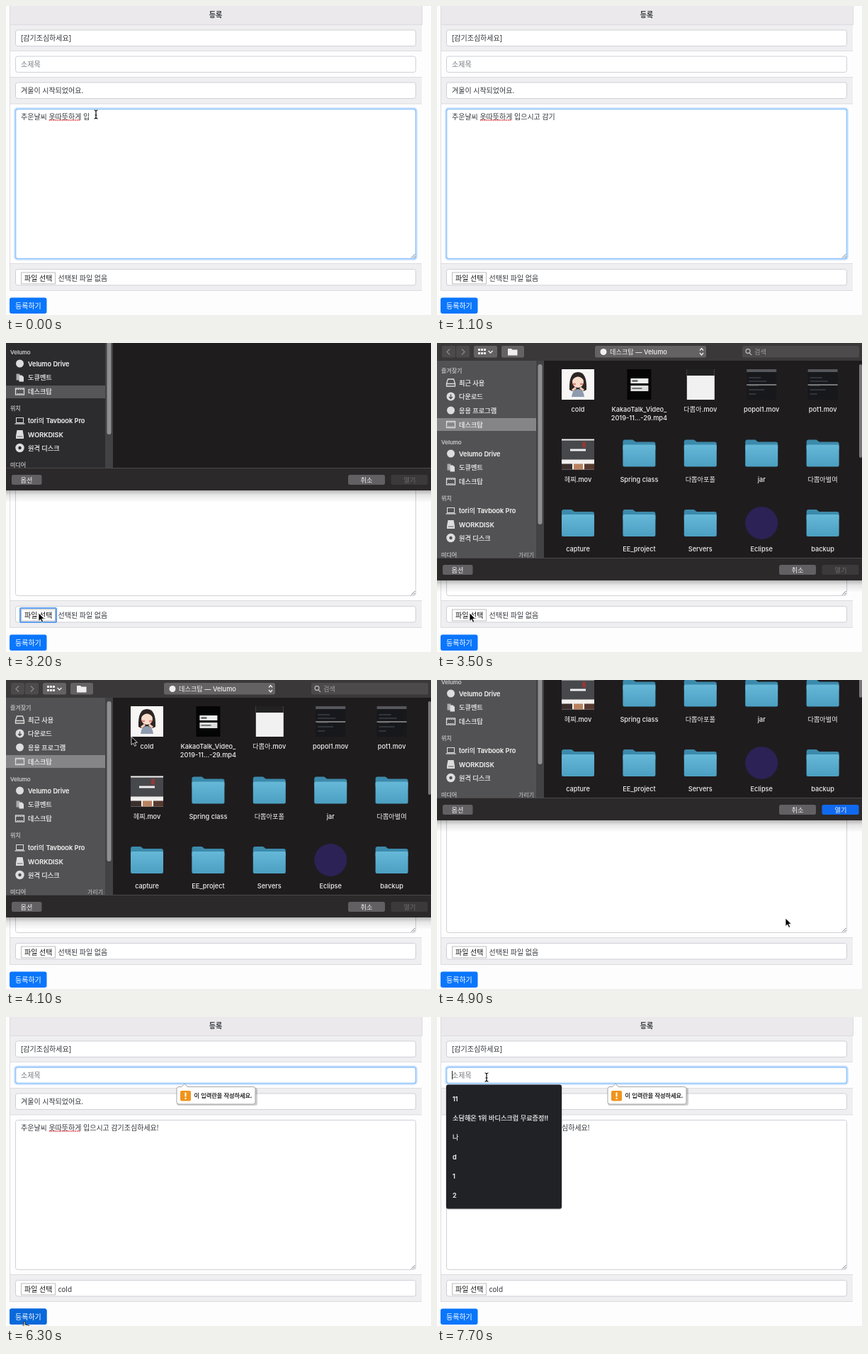
An HTML page that plays this animation: 600 by 436 pixels, repeating every 8000 ms.

```html
<!DOCTYPE html>
<html lang="ko">
<head>
<meta charset="utf-8">
<title>등록</title>
<style>
html, body { margin: 0; width: 100%; height: 100%; overflow: hidden; background: #fefdfe; }
svg { display: block; width: 600px; height: 436px; }
text { font: 10px "Noto Sans", "Noto Sans CJK KR", sans-serif; fill: #33363b; white-space: pre; }
.ui text { font: 500 9.2px Inter, "Noto Sans CJK KR", sans-serif; fill: #f0f0f0; }
.ui .head { font-size: 8px; fill: #c2c2c4; }
#side text, #menu text { stroke: #f0f0f0; stroke-width: .22px; }
#side .head { stroke: #c2c2c4; }
#bubble text { font-size: 8.2px; font-weight: 500; fill: #111; stroke: #111; stroke-width: .22px; }
.mid { text-anchor: middle; }
.field { fill: #fff; stroke: #ced1d6; }
.focus rect { fill: none; stroke: #8fc4fb; stroke-width: 1.6; }
.focus rect + rect { stroke: #bfdcff; stroke-width: 1.4; }

/* 8 s loop: 1% is 80 ms */
.on { opacity: 0; animation: 8s step-end infinite; }
#areaFocus { animation-name: areaFocus; }
#subFocus { animation-name: subFocus; }
#pickFocus { animation-name: pickFocus; }
#noFile { animation-name: noFile; }
#gotFile { animation-name: gotFile; }
#hover { animation-name: hover; }
#press { animation-name: press; }
#caret { animation-name: caret; }
#menu { animation-name: menu; }
.dim { animation-name: dim; }
.lit { animation-name: lit; }
#picked, #openOn { animation-name: picked; }
#beam { animation-name: beam; }
#arrow { animation-name: arrow; }
#hand { animation-name: hand; }
@keyframes areaFocus { 0% { opacity: 1 } 35.6%, 100% { opacity: 0 } }
@keyframes subFocus { 0% { opacity: 0 } 68.75%, 100% { opacity: 1 } }
@keyframes pickFocus { 0%, 42.5% { opacity: 0 } 35.6%, 62.5% { opacity: 1 } 68.75%, 100% { opacity: 0 } }
@keyframes noFile { 0% { opacity: 1 } 62.5%, 100% { opacity: 0 } }
@keyframes gotFile { 0% { opacity: 0 } 62.5%, 100% { opacity: 1 } }
@keyframes hover { 0% { opacity: 0 } 64.5% { opacity: 1 } 86%, 100% { opacity: 0 } }
@keyframes press { 0% { opacity: 0 } 65% { opacity: 1 } 68.75%, 100% { opacity: 0 } }
@keyframes caret {
  0%, 75%, 87.5% { opacity: 0 }
  68.75%, 81.25%, 92.5%, 100% { opacity: 1 }
}
@keyframes menu { 0% { opacity: 0 } 93.75%, 100% { opacity: 1 } }
@keyframes dim { 0% { opacity: 1 } 42.5%, 100% { opacity: 0 } }
@keyframes lit { 0% { opacity: 0 } 42.5%, 100% { opacity: 1 } }
@keyframes picked { 0% { opacity: 0 } 53.75%, 100% { opacity: 1 } }
@keyframes beam { 0%, 30%, 89%, 100% { opacity: 1 } 1.25%, 33.75% { opacity: 0 } }
@keyframes arrow { 0%, 64.5%, 89%, 100% { opacity: 0 } 33.75%, 86% { opacity: 1 } }
@keyframes hand { 0% { opacity: 0 } 64.5% { opacity: 1 } 86%, 100% { opacity: 0 } }

#bubble { animation: bubble 8s linear infinite; }
@keyframes bubble { 0%, 71.25% { opacity: 0 } 75%, 100% { opacity: 1 } }

#sheet { animation: sheet 8s step-end infinite; }
@keyframes sheet {
  0%, 62.5%, 100% { transform: translateY(-370px) }
  40% { transform: translateY(-127px) }
  41.25% { transform: translateY(-32px) }
  42.5% { transform: none }
  60% { transform: translateY(-32px) }
  61.25% { transform: translateY(-137px) }
}

#pointer { animation: pointer 8s ease-in-out infinite; }
@keyframes pointer {
  0%, 30% { transform: translate(127px, 153px) }
  35%, 43.75% { transform: translate(46px, 381px) }
  50%, 51.25% { transform: translate(177px, 80px) }
  53.1%, 53.75% { transform: translate(198px, 62px) }
  56.9%, 58.75% { transform: translate(568px, 319px) }
  61.25% { transform: translate(492px, 336px) }
  65%, 85% { transform: translate(26px, 430px) }
  90%, 100% { transform: translate(70px, 85px) }
}

.ring { fill: none; stroke: #111; stroke-width: 1.5; opacity: 0; animation: ring 8s linear infinite; }
@keyframes ring {
  0% { r: 8px; opacity: 1 }
  1.25% { r: 23.5px; opacity: 1 }
  3.75%, 100% { r: 42px; opacity: 0 }
}
</style>
</head>
<body>
<svg viewBox="0 0 600 436">
  <defs>
    <linearGradient id="shade" x2="0" y2="1">
      <stop stop-color="#000" stop-opacity=".28"/>
      <stop offset=".4" stop-color="#000" stop-opacity=".09"/>
      <stop offset="1" stop-color="#000" stop-opacity="0"/>
    </linearGradient>
    <linearGradient id="blue" x2="0" y2="1">
      <stop stop-color="#66b8d8"/><stop offset="1" stop-color="#4b9fc1"/>
    </linearGradient>
    <g id="folder">
      <path d="M-23 -17q0-3 3-3h11l4 3h25q3 0 3 3v8h-46z" fill="#3c8aab"/>
      <rect x="-23" y="-13" width="46" height="31" rx="2" fill="url(#blue)"/>
    </g>
  </defs>

  <g id="page">
    <rect width="600" height="436" fill="#fefdfe"/>
    <g fill="#efeef0">
      <rect x="5" width="582" height="27" fill="#ebe9ec"/>
      <rect x="5" y="27" width="582" height="37"/>
      <rect x="5" y="101" width="582" height="37"/>
      <rect x="5" y="364" width="582" height="37"/>
    </g>
    <path d="M5.5 0V401.5H587M5 26.5H587.5V0M5 63.5H587M5 100.5H587M5 138H587M5 363.5H587" fill="none" stroke="#dcdbdf"/>
    <g class="field">
      <rect x="13.5" y="34" width="565" height="22.5" rx="3"/>
      <rect x="13.5" y="71" width="565" height="22.5" rx="3"/>
      <rect x="13.5" y="108" width="565" height="22.5" rx="3"/>
      <rect x="13.5" y="145.5" width="565" height="211" rx="3"/>
      <rect x="13.5" y="371.5" width="565" height="22.5" rx="3"/>
    </g>
    <path d="M572 355.5l5.5-5.5M575 355.5l2.5-2.5" stroke="#666" stroke-width=".9"/>
    <g id="areaFocus" class="on focus">
      <rect x="13.5" y="145.5" width="565" height="211" rx="3"/>
      <rect x="12" y="144" width="568" height="214" rx="4"/>
    </g>
    <g id="subFocus" class="on focus">
      <rect x="13.5" y="71" width="565" height="22.5" rx="3"/>
      <rect x="12" y="69.5" width="568" height="25.5" rx="4"/>
    </g>
    <text class="mid" x="296" y="16" style="font-weight:700">등록</text>
    <text x="21" y="48.5">[감기조심하세요]</text>
    <text x="21" y="85.5" style="fill:#74797f">소제목</text>
    <text x="21" y="122.5">겨울이 시작되었어요.</text>
    <text id="typed" x="21" y="159.5">추운날씨 옷따뜻하게 입</text>
    <path d="M61 161H105" stroke="#e0343c" stroke-width="1.5" stroke-dasharray="1.6 1"/>
    <path id="caret" class="on" d="M21.5 76V88" stroke="#222"/>

    <rect x="21.5" y="376" width="48" height="16" fill="#fff" stroke="#bdbdbd"/>
    <rect id="pickFocus" class="on" x="20" y="374" width="51" height="20" rx="1.5" fill="none" stroke="#5f9ff0" stroke-width="2.2"/>
    <text x="26" y="387.5" style="fill:#111">파일 선택</text>
    <text id="noFile" class="on" x="73.5" y="387.5">선택된 파일 없음</text>
    <text id="gotFile" class="on" x="73.5" y="387.5">cold</text>

    <g fill="#0a76fc">
      <rect x="5" y="411.5" width="52.5" height="22.5" rx="3"/>
      <rect id="hover" class="on" x="5" y="411.5" width="52.5" height="22.5" rx="3" fill="#0869da"/>
      <rect id="press" class="on" x="5" y="411.5" width="52.5" height="22.5" rx="3" fill="#0a5dc6"/>
    </g>
    <text x="13" y="426.5" style="fill:#fff">등록하기</text>
  </g>

  <g id="bubble">
    <path d="M244 100h7l3-5 3 5h95q3 0 3 3v19q0 3-3 3h-108q-3 0-3-3v-19q0-3 3-3z" fill="#000" opacity=".18"/>
    <path d="M244 98.5h4l4-4.5 4 4.5h93q3 0 3 3v18.5q0 3-3 3h-105q-3 0-3-3v-18.5q0-3 3-3z" fill="#fff" stroke="#a5a5a5"/>
    <rect x="246" y="104" width="15" height="14.5" rx="2" fill="#f0941d"/>
    <path d="M253.5 106.5v6M253.5 114v2" stroke="#fff" stroke-width="2"/>
    <text x="265.5" y="114">이 입력란을 작성하세요.</text>
  </g>
  <g id="menu" class="on ui">
    <rect x="12.5" y="95.5" width="164" height="176" rx="3.5" fill="#000" opacity=".25"/>
    <rect x="13" y="95.5" width="163" height="175" rx="3" fill="#212226"/>
  </g>

  <g id="sheet" class="ui">
    <rect y="335" width="600" height="17" fill="url(#shade)"/>
    <rect width="600" height="335" fill="#2b292a"/>
    <rect width="600" height="25" fill="#3a3839"/>
    <g fill="#4d4a4c">
      <rect x="7" y="4" width="19" height="16.5" rx="2.5"/>
      <rect x="27" y="4" width="19" height="16.5" rx="2.5"/>
      <rect x="431" y="4" width="165" height="16.5" rx="2.5"/>
      <g fill="#656264">
        <rect x="52" y="4" width="33" height="16.5" rx="2.5"/>
        <rect x="91" y="4" width="32" height="16.5" rx="2.5"/>
        <rect x="223" y="4" width="157" height="16.5" rx="2.5"/>
      </g>
    </g>
    <g fill="none" stroke="#8a8789" stroke-width="1.3">
      <path d="M18 8.5l-4 4 4 4M35 8.5l4 4-4 4"/>
      <g stroke="#b5b2b4"><circle cx="439" cy="11.5" r="3"/><path d="M441 14l3 3"/></g>
      <path d="M72.5 11l3 3 3-3M371 10.500l2.500-3 2.500 3M371 14l2.500 3 2.500-3" stroke="#eee"/>
    </g>
    <path d="M58 9.5h11M58 14.5h11" stroke="#eee" stroke-width="3" stroke-dasharray="3 1"/>
    <path d="M100 8h5l1.5 1.5h7v8h-13.5z" fill="#eee"/>
    <circle cx="235" cy="12.5" r="4.5" fill="#f0f0f0"/>
    <text x="244" y="16">데스크탑 — Velumo</text>
    <text x="448" y="16" style="fill:#a09d9f">검색</text>

    <rect y="25" width="140" height="279" fill="#525254"/>
    <g class="on dim">
      <rect y="25" width="140" height="279" fill="#2c2b2d"/>
      <rect y="187" width="140" height="18" fill="#565658"/>
    </g>
    <g class="on lit">
      <rect y="106" width="140" height="18" fill="#858587"/>
      <text class="head" x="115" y="302">가리기</text>
    </g>
    <rect x="140" y="25" width="11" height="279" fill="#424144"/>
    <rect x="142.5" y="30" width="6" height="226" rx="3" fill="#8f8e91"/>
    <g id="side"></g>

    <rect x="151" y="25" width="449" height="278" fill="#1f1c1e"/>
    <g class="on lit">
      <g id="picked" class="on">
        <rect x="173" y="34" width="52" height="49" rx="3" fill="#434144"/>
        <rect x="185" y="87" width="28" height="13" rx="2.5" fill="#1260d8"/>
      </g>
      <g id="files"></g>
      <rect x="596" y="30" width="4" height="132" rx="2" fill="#777578"/>
    </g>

    <path d="M0 303.5H600" stroke="#4a484a"/>
    <rect y="304" width="600" height="31" fill="#2b292a"/>
    <g fill="#626062">
      <rect x="8" y="313" width="42.5" height="14" rx="2.5"/>
      <rect x="483" y="313" width="52" height="14" rx="2.5"/>
      <rect x="543.5" y="313" width="52" height="14" rx="2.5" fill="#3b393a"/>
    </g>
    <text class="mid" x="29" y="323.5">옵션</text>
    <text class="mid" x="509" y="323.5">취소</text>
    <text class="mid" x="570" y="323.5" style="fill:#6f6d6e">열기</text>
    <g id="openOn" class="on">
      <rect x="543.5" y="313" width="52" height="14" rx="2.5" fill="#1069ee"/>
      <text class="mid" x="570" y="323.5">열기</text>
    </g>
  </g>

  <g id="rings"></g>
  <g id="pointer">
    <path id="beam" class="on" d="M-2.5 -6q2.5 0 2.5 2v8q0 2-2.5 2M2.5 -6q-2.5 0-2.5 2v8q0 2 2.5 2M-1.5 1h3" fill="none" stroke="#111" stroke-width="1.2"/>
    <path id="arrow" class="on" d="M0 0v11.5l2.7-2.5 2 4.3 2-.9-2-4.2h3.7z" fill="#000" stroke="#fff" stroke-width=".8"/>
    <path id="hand" class="on" d="M-1 0q1-1.5 2 0v4l5 1q1.5 .5 1 3l-1 5h-6l-4-6q0-1.5 1.5-1l1.5 1z" fill="#fff" stroke="#111" stroke-width=".9"/>
  </g>
</svg>
<script>
const $ = id => document.getElementById(id);
const label = (x, y, s, cls = "") => `<text class="${cls}" x="${x}" y="${y}">${s}</text>`;
const box = (x, y, w, h, fill) => `<rect x="${x}" y="${y}" width="${w}" height="${h}" fill="${fill}"/>`;

// Sidebar
const icons = {
  drawer: '<path d="M-4 -5h8l2 6v4h-12v-4zM-5.5 1.5h11" fill="none" stroke="#ddd" stroke-width="1.3"/>',
  down: '<circle r="6" fill="#ddd"/><path d="M0 -3v6M-2.5 .5l2.5 2.5 2.5-2.5" fill="none" stroke="#525254" stroke-width="1.4"/>',
  dot: '<circle r="5.5" fill="#ddd"/>',
  desk: '<rect x="-6" y="-4.5" width="12" height="9" fill="none" stroke="#ddd" stroke-width="1.3"/><path d="M-6 -3h12M-4 3h8" stroke="#ddd" stroke-dasharray="2 1"/>',
  doc: '<path d="M-5 -5h5v9h-5z" fill="#aaa"/><path d="M-1 -3h4l2.5 2.5v6.5h-6.5z" fill="#ddd"/>',
  laptop: '<rect x="-5" y="-4" width="10" height="7" fill="none" stroke="#ddd"/><path d="M-7 4.5h14" stroke="#ddd" stroke-width="1.3"/>',
  drive: '<path d="M-4 -6h8l1.5 8v4h-11v-4z" fill="#ddd"/><path d="M-4 3h8" stroke="#666"/>',
  disc: '<circle r="4.2" fill="none" stroke="#ddd" stroke-width="4"/>'
};
const side = [
  [38.5, "즐겨찾기"], [56, "최근 사용", "drawer"], [75.5, "다운로드", "down"],
  [95, "응용 프로그램", "dot"], [115, "데스크탑", "desk"],
  [139.5, "Velumo"], [156, "Velumo Drive", "dot"], [175.5, "도큐멘트", "doc"], [195.5, "데스크탑", "desk"],
  [219, "위치"], [236.5, "tori의 Tavbook Pro", "laptop"], [256, "WORKDISK", "drive"],
  [275, "원격 디스크", "disc"], [299, "미디어"]
];
$("side").innerHTML = side.map(([y, s, icon]) => icon
  ? `<g transform="translate(19.5 ${y})">${icons[icon]}</g>` + label(31, y + 3.7, s)
  : label(6, y + 3, s, "head")).join("");

// File grid; thumbnails are drawn around their centre
const folder = '<use href="#folder"/>';
const codeView = box(-21, -21, 42, 43, "#17181c") + box(-21, -21, 42, 4, "#55575c")
  + '<path d="M-18 -9h17M-18 -4h25M-18 2h14M-18 8h22M-18 14h10" stroke="#4d5358"/>' + box(-21, 0, 42, 2, "#777");
const files = [
  ["cold", box(-23, -21, 46, 43, "#f7f6f5")
    + '<path d="M-12 8q-1-25 12-25t12 25l-4 2h-16z" fill="#2d2523"/><ellipse cy="-3" rx="8" ry="8" fill="#f8dccb"/>'
    + '<path d="M-8 -6q8-9 16 0v-6h-16z" fill="#2d2523"/><path d="M-9 18q1-11 9-11t9 11z" fill="#8e9bb0"/>'
    + '<path d="M-7 0h4M3 0h4" stroke="#e58380" stroke-width="2.5"/><path d="M-8 9l5-4M8 9l-5-4" stroke="#f3cdb8" stroke-width="3"/>'],
  ["KakaoTalk_Video_", box(-17, -21, 34, 43, "#050505") + box(-12, -8, 25, 7, "#eee") + box(-12, 2, 25, 8, "#ddd")
    + box(-10, -6, 8, 3, "#777") + box(-10, 5, 14, 2, "#777")],
  ["다뽑아.mov", box(-19, -21, 39, 43, "#f1f1f1") + box(-19, -21, 39, 9, "#222")],
  ["popol1.mov", codeView], ["pot1.mov", codeView],
  ["헤찌.mov", box(-23, -21, 46, 43, "#f2f0ee") + box(-23, -19, 46, 27, "#46484c") + box(-11, -7, 22, 3, "#eee")
    + box(6, -17, 5, 8, "#8f3a36") + box(-23, 14, 15, 8, "#3a2f2c") + box(-6, 14, 13, 8, "#b9825f") + box(9, 14, 14, 8, "#57392f")],
  ["Spring class", folder], ["다뽑아포폴", folder], ["jar", folder], ["다뽑아벌여", folder],
  ["capture", folder], ["EE_project", folder], ["Servers", folder],
  ["Eclipse", '<circle r="23" cy="-1" fill="#2c2255"/>'], ["backup", folder]
];
$("files").innerHTML = files.map(([name, art], i) => {
  const x = 199 + i % 5 * 86.4, y = 58 + Math.floor(i / 5) * 98.5;
  return `<g transform="translate(${x} ${y})">${art}</g>` + label(x, y + 39.3, name, "mid");
}).join("") + label(285.4, 109, "2019-11...-29.mp4", "mid");

// Suggestions
$("menu").innerHTML += ["11", "소담해온 1위 바디스크럽 무료증정!!", "나", "d", "1", "2"]
  .map((s, i) => label(22, 118.6 + i * 27.3, s)).join("");

// Click rings: x, y, time
$("rings").innerHTML = [[47, 384, 2800], [198, 62, 4250], [568, 319, 4550], [26.5, 430, 5200], [70, 85, 7380]]
  .map(([x, y, ms]) => `<circle class="ring" cx="${x}" cy="${y}" style="animation-delay:${ms}ms"/>`).join("");

// Typing: each stroke replaces the syllable being composed
const strokes = ("입ㅇ 으 읏 으시 식 시고 고_ _ㄱ 가 감 "
  + "감ㄱ 기 깆 기조 좃 조시 심 심ㅎ 하 핫 하세 셍 세요 요!").split(" ");
const strokeTime = k => k < 10 ? 100 + k * 90 : k < 21 ? 1000 + (k - 10) * 82 : k < 23 ? 1900 + (k - 21) * 100 : 2300;
const states = ["추운날씨 옷따뜻하게 입"];
strokes.forEach((s, i) => states.push(states[i].slice(0, -1) + s));

let start, shown = 0;
function tick(now) {
  start ??= now;
  const t = (now - start) % 8000;
  const n = strokes.filter((_, k) => strokeTime(k) <= t).length;
  if (n !== shown) $("typed").textContent = states[shown = n].replace("_", " ");
  requestAnimationFrame(tick);
}
requestAnimationFrame(tick);
</script>
</body>
</html>
```
